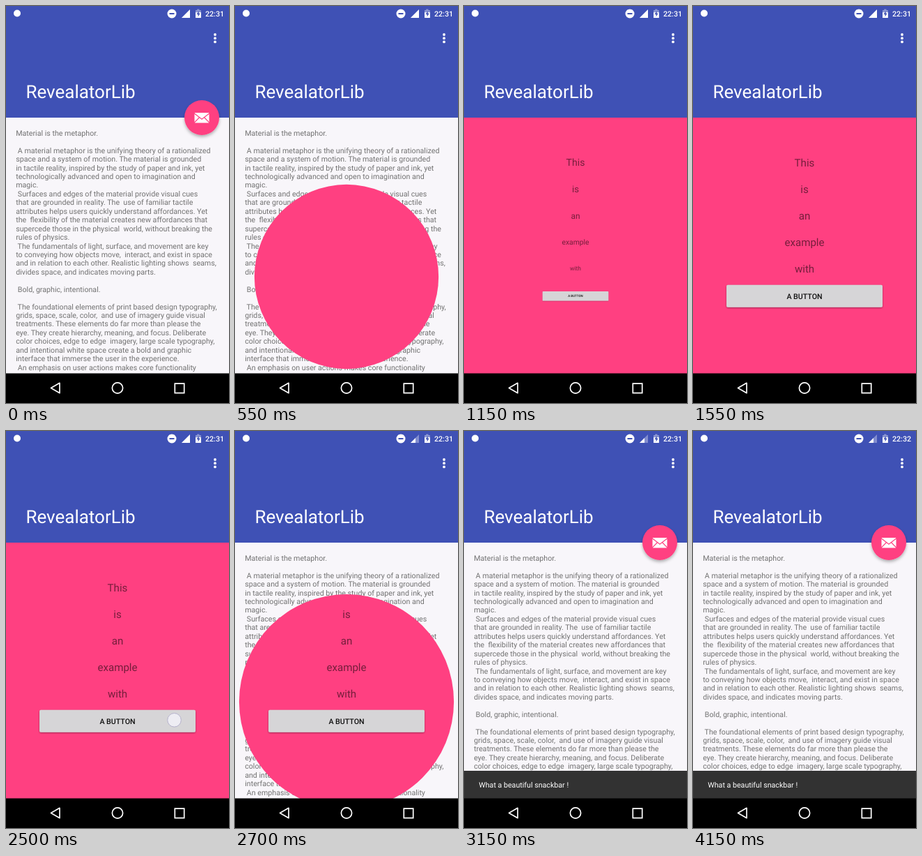
Write an HTML page that moves like this. It is 320 px wide and 569 px high and loops after 4.2 s.

```html
<!DOCTYPE html>
<html lang="en">
<head>
<meta charset="utf-8">
<title>Circular reveal</title>
<style>
  html, body { margin: 0; width: 100%; height: 100%; overflow: hidden; background: #000; }
  svg { display: block; width: 100vw; height: 100vh; }
  text { font: 10.67px Roboto, sans-serif; white-space: pre; text-rendering: geometricPrecision; }
  #body text { fill: #727272; }
  #items text { font-size: 15.1px; fill: #000; fill-opacity: .54; text-anchor: middle; }
  #items .label { font-size: 10.67px; font-weight: 500; fill: #111; fill-opacity: 1; }
</style>
</head>
<body>
<svg viewBox="0 0 320 569">
  <defs>
    <clipPath id="reveal"><circle id="hole" cx="160" cy="388"/></clipPath>
    <filter id="shadow" x="-30%" y="-30%" width="160%" height="170%">
      <feDropShadow dx="0" dy="2.5" stdDeviation="2.2" flood-opacity=".3"/>
    </filter>
    <filter id="lowShadow" x="-5%" y="-20%" width="110%" height="150%">
      <feDropShadow dx="0" dy="1" stdDeviation=".8" flood-opacity=".4"/>
    </filter>
  </defs>

  <rect width="320" height="527" fill="#f8f6fa"/>
  <g id="body"></g>

  <g id="pane" clip-path="url(#reveal)">
    <rect y="160" width="320" height="367" fill="#ff4081"/>
    <g id="items"></g>
  </g>

  <rect width="320" height="160" fill="#3f51b5"/>
  <text x="28.4" y="132" fill="#fff" style="font-size:26px">RevealatorLib</text>
  <g fill="#fff">
    <circle cx="300" cy="41" r="1.9"/><circle cx="300" cy="46.2" r="1.9"/><circle cx="300" cy="51.4" r="1.9"/>
    <circle cx="16" cy="10.5" r="5"/>
    <circle cx="238" cy="11" r="6.5"/>
    <path d="M234.5 10h7v2h-7z" fill="#3f51b5"/>
    <path d="M252 17h12V5z" opacity=".35"/>
    <path id="signal"/>
    <path d="M272 6h2.2V4.6h3.2V6h2.4v11H272z" opacity=".4"/>
    <path d="M272 9h7.8v8H272z"/>
    <path d="M276.6 7l-3 5h2v3.6l3-5h-2z" fill="#3f51b5"/>
    <text id="clock" x="286" y="15" font-weight="500" style="font-weight:500"></text>
  </g>

  <g id="fab">
    <circle r="25" fill="#ff4081" filter="url(#shadow)"/>
    <rect x="-10.5" y="-7" width="21" height="14.5" rx="1" fill="#fff"/>
    <path d="M-11-6.2L0 2.2 11-6.2M-11 7.4L-3.8 0M11 7.4L3.8 0" fill="none" stroke="#ff4081" stroke-width="1.2"/>
  </g>

  <g id="snackbar">
    <rect y="487" width="320" height="42" fill="#323232"/>
    <text id="message" x="21.3" y="510.7" fill="#fff">What a beautiful snackbar !</text>
  </g>

  <rect y="526.5" width="320" height="43"/>
  <g fill="none" stroke="#fff" stroke-width="1.7" stroke-linejoin="round">
    <path d="M64.5 547.5L77 540.3v14.4z"/>
    <circle cx="160" cy="547.5" r="7.6"/>
    <path d="M242.3 541.2h13.4v13.4h-13.4z" stroke-linejoin="miter"/>
  </g>

  <circle id="touch" r="9.8" fill="#f4f2fa" fill-opacity=".8" stroke="#b5b2cc" stroke-width="1"/>
</svg>

<script>
const LOOP = 4200, STEP = 50;
const HOME = { x: 281, y: 160 }, CENTER = { x: 160, y: 388 };
const FAB_RADIUS = 25, FULL_RADIUS = 279;

const article = `Material is the metaphor.

 A material metaphor is the unifying theory of a rationalized
space and a system of motion. The material is grounded
in tactile reality, inspired by the study of paper and ink, yet
technologically advanced and open to imagination and
magic.
 Surfaces and edges of the material provide visual cues
that are grounded in reality. The  use of familiar tactile
attributes helps users quickly understand affordances. Yet
the  flexibility of the material creates new affordances that
supercede those in the physical  world, without breaking the
rules of physics.
 The fundamentals of light, surface, and movement are key
to conveying how objects move,  interact, and exist in space
and in relation to each other. Realistic lighting shows  seams,
divides space, and indicates moving parts.

 Bold, graphic, intentional.

 The foundational elements of print based design typography,
grids, space, scale, color,  and use of imagery guide visual
treatments. These elements do far more than please the
eye. They create hierarchy, meaning, and focus. Deliberate
color choices, edge to edge  imagery, large scale typography,
and intentional white space create a bold and graphic
interface that immerse the user in the experience.
 An emphasis on user actions makes core functionality`;

const $ = id => document.getElementById(id);
const set = (id, attrs) => {
  for (const name in attrs) $(id).setAttribute(name, attrs[name]);
};
const show = (id, visible) => { $(id).style.display = visible ? '' : 'none'; };

$('body').innerHTML = article.split('\n')
  .map((line, i) => `<text x="14.2" y="${185.8 + i * 12.44}">${line}</text>`).join('');

const words = ['This', 'is', 'an', 'example', 'with'];
$('items').innerHTML = words.map(word => `<g><text y="5.4">${word}</text></g>`).join('') +
  `<g><rect x="-112" y="-16" width="224" height="32" rx="2" fill="#d6d5d7" filter="url(#lowShadow)"/>
   <text class="label" y="3.9">A BUTTON</text></g>`;
const items = [...$('items').children];

// Easing
const progress = (t, start, duration) => Math.min(1, Math.max(0, (t - start) / duration));
const accelerateDecelerate = p => .5 - .5 * Math.cos(Math.PI * p);
const decelerate = p => 1 - (1 - p) ** 2;
const cubic = (a, b, s) => 3 * a * s * (1 - s) ** 2 + 3 * b * s * s * (1 - s) + s ** 3;
const bezierEase = (x1, y1, x2, y2) => p => {
  let low = 0, high = 1;
  for (let i = 0; i < 24; i++) {
    const mid = (low + high) / 2;
    if (cubic(x1, x2, mid) < p) low = mid; else high = mid;
  }
  return cubic(y1, y2, high);
};
const linearOutSlowIn = bezierEase(0, 0, .2, 1);
const fastOutSlowIn = bezierEase(.4, 0, .2, 1);

function drawPane(t) {
  const opening = accelerateDecelerate(progress(t, 415, 300));
  const closing = accelerateDecelerate(progress(t, 2560, 300));
  const radius = t < 2560
    ? FAB_RADIUS + (FULL_RADIUS - FAB_RADIUS) * opening
    : FULL_RADIUS * (1 - closing);
  show('pane', t >= 415 && t < 2860);
  set('hole', { r: radius });
  items.forEach((item, i) => {
    const scale = decelerate(progress(t, 780 + 50 * i, 500));
    const y = i < words.length ? 224.3 + 38 * i : 415.8;
    item.setAttribute('transform', `translate(160 ${y}) scale(${scale})`);
  });
}

function drawFab(t) {
  let { x, y } = HOME, scale = 1;
  if (t < 415) {
    // Quadratic arc whose control point is (CENTER.x, HOME.y)
    const p = accelerateDecelerate(progress(t, 200, 215));
    x = CENTER.x + (HOME.x - CENTER.x) * (1 - p) ** 2;
    y = HOME.y + (CENTER.y - HOME.y) * p * p;
  } else {
    scale = linearOutSlowIn(progress(t, 2867, 200));
  }
  show('fab', scale > 0);
  set('fab', { transform: `translate(${x} ${y}) scale(${scale})`, opacity: scale });
}

function drawSnackbar(t) {
  const p = fastOutSlowIn(progress(t, 2875, 250));
  show('snackbar', p > 0);
  set('snackbar', { transform: `translate(0 ${40 * (1 - p)})` });
  set('message', { opacity: fastOutSlowIn(progress(t, 2945, 180)) });
}

function drawTouch(t) {
  const onFab = t >= 150 && t < 250, onButton = t >= 2500 && t < 2600;
  show('touch', onFab || onButton);
  set('touch', onFab ? { cx: HOME.x, cy: HOME.y } : { cx: 241.5, cy: 414.3 });
}

function draw(t) {
  drawPane(t);
  drawFab(t);
  drawSnackbar(t);
  drawTouch(t);
  set('signal', { d: t < 2700 ? 'M252 17h12V5z' : 'M252 17h7V10z' });
  $('clock').textContent = t < 4150 ? '22:31' : '22:32';
}

const startTime = performance.now();
function tick() {
  const t = (performance.now() - startTime) % LOOP;
  draw(Math.floor(t / STEP) * STEP);
  requestAnimationFrame(tick);
}
tick();
</script>
</body>
</html>
```
